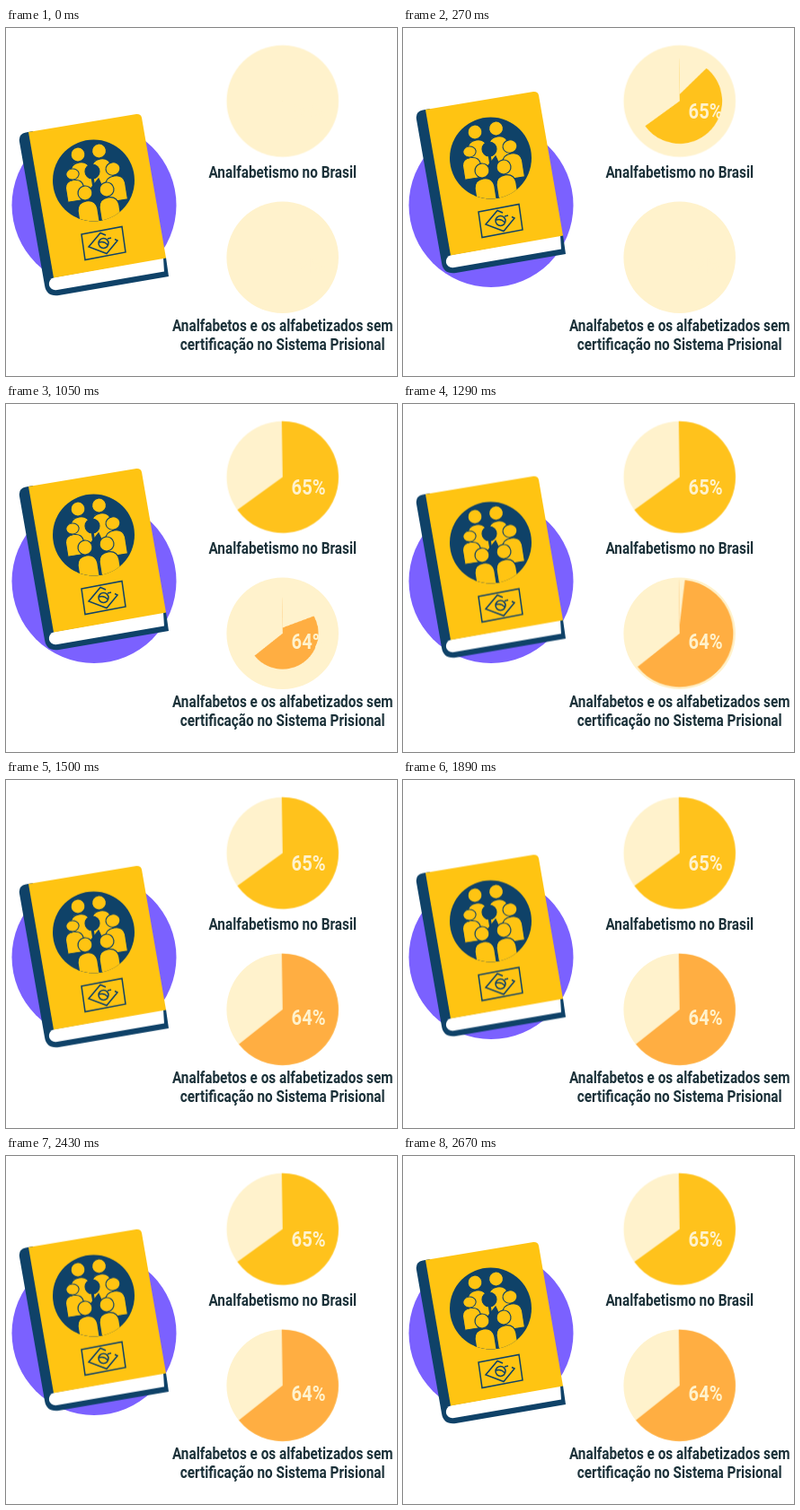
Write an HTML page without scripts that moves like this. It is 435x388 px and loops after 3000 ms.

```html
<!DOCTYPE html>
<html lang="pt-BR">
<head>
<meta charset="utf-8">
<title>Analfabetismo</title>
<style>
html, body { margin: 0; width: 100%; height: 100%; overflow: hidden; background: #fff; }
svg { display: block; width: 435px; height: 388px; }

text {
  font-family: Roboto, "Liberation Sans", sans-serif;
  font-weight: 700;
  text-anchor: middle;
}
.label { font-size: 17.5px; fill: #1b3139; }
.value { font-size: 23px; fill: #fff2cc; }
.disc { fill: #fff2cc; }
.navy { fill: #0f4268; }
.gold { fill: #ffc412; }
.line { fill: none; stroke: #0f4268; stroke-width: 1.5; }
.person { fill: #ffc412; stroke: #0f4268; stroke-width: 1.2; }
.wipe { fill: none; stroke: #fff; stroke-width: 80; stroke-dasharray: 360 360; }

.book { animation: bob 3s ease-in-out infinite; }
.pie, .wipe {
  animation-duration: 3s;
  animation-iteration-count: infinite;
  animation-timing-function: cubic-bezier(.25, .5, .45, 1);
}
.pie.first { animation-name: grow-first; }
.pie.second { animation-name: grow-second; }
.wipe.first { animation-name: wipe-first; }
.wipe.second { animation-name: wipe-second; }

@keyframes bob {
  0%, 23%, 51%, 54%, 89%, 100% { transform: translateY(0); }
  9%, 37%, 72%, 74.3% { transform: translateY(-25px); }
}
@keyframes grow-first {
  0% { transform: scale(0); }
  20%, 100% { transform: scale(1); }
}
@keyframes grow-second {
  0%, 28% { transform: scale(0); }
  48%, 100% { transform: scale(1); }
}
@keyframes wipe-first {
  0% { stroke-dashoffset: -196; }
  20%, 100% { stroke-dashoffset: 0; }
}
@keyframes wipe-second {
  0%, 28% { stroke-dashoffset: -196; }
  48%, 100% { stroke-dashoffset: 0; }
}
</style>
</head>
<body>
<svg viewBox="0 0 435 388">
  <defs>
    <g id="person">
      <path d="M-11 40V19Q-10 9 0 9Q10 9 11 19V40Z"/>
      <circle r="8"/>
    </g>
    <clipPath id="badge"><circle cx="97.5" cy="170" r="45.5"/></clipPath>
    <!-- The sweep turns about a point slightly above the pie centre. -->
    <mask id="sweep-first" maskUnits="userSpaceOnUse" x="-80" y="-80" width="160" height="160">
      <circle class="wipe first" r="40" pathLength="360" transform="translate(0 -10) rotate(-91)"/>
    </mask>
    <mask id="sweep-second" maskUnits="userSpaceOnUse" x="-80" y="-80" width="160" height="160">
      <circle class="wipe second" r="40" pathLength="360" transform="translate(0 -10) rotate(-91)"/>
    </mask>
  </defs>

  <circle cx="98" cy="197.5" r="91.5" fill="#7b61ff"/>

  <g class="book">
    <path class="navy" d="M15 127Q13.500 118 22 116.500L30 115L54 270L178 256L181 277L59 298Q45 300 43 287Z"/>
    <path fill="#fff" d="M175 256L54 278Q47 280 48 287Q50 293 57 292L176 271.500Z"/>
    <path class="gold" d="M25 116L145 96Q150 95.500 151 100L178 256.500L53 278.500Z"/>
    <circle class="navy" cx="97.5" cy="170" r="45.5"/>
    <g class="person" clip-path="url(#badge)">
      <use href="#person" transform="translate(80 141) rotate(-9)"/>
      <use href="#person" transform="translate(103.500 137) rotate(-9)"/>
      <use href="#person" transform="translate(74 163) rotate(-9) scale(.9 .75)"/>
      <use href="#person" transform="translate(119 157) rotate(-9) scale(1 .9)"/>
      <circle class="navy" cx="96" cy="160" r="8"/>
      <path class="navy" d="M80 197L103 168L113 190L107 217H80Z"/>
      <use href="#person" transform="translate(88 184) rotate(-9)"/>
      <use href="#person" transform="translate(112 180) rotate(-9)"/>
    </g>
    <g class="line">
      <path d="M84 230L129 221.500L133 250L88 258.500Z"/>
      <path d="M111 231L105 228.500L92 244L112 251.500L124 237L121 235.500M113 235L117 234"/>
      <circle cx="108.500" cy="240" r="5.500"/>
      <path d="M103.500 239Q109 237 113.500 242"/>
    </g>
  </g>

  <g transform="translate(307.700 81.500)">
    <circle class="disc" r="62.300"/>
    <g class="pie first">
      <path fill="#ffc21c" mask="url(#sweep-first)" d="M0 0L-1 -62.200A62.200 62.200 0 1 1 -50.300 36.600Z"/>
    </g>
    <g transform="scale(.875 1)">
      <text class="value" x="33" y="19.500">65%</text>
      <text class="label" y="85.500">Analfabetismo no Brasil</text>
    </g>
  </g>

  <g transform="translate(307.700 255.800)">
    <circle class="disc" r="62.300"/>
    <g class="pie second">
      <path fill="#ffae42" mask="url(#sweep-second)" d="M0 0L-1 -62.200A62.200 62.200 0 1 1 -48.700 38.700Z"/>
    </g>
    <g transform="scale(.875 1)">
      <text class="value" x="33" y="17">64%</text>
      <text class="label" y="82">Analfabetos e os alfabetizados sem</text>
      <text class="label" y="103">certificação no Sistema Prisional</text>
    </g>
  </g>
</svg>
</body>
</html>
```
